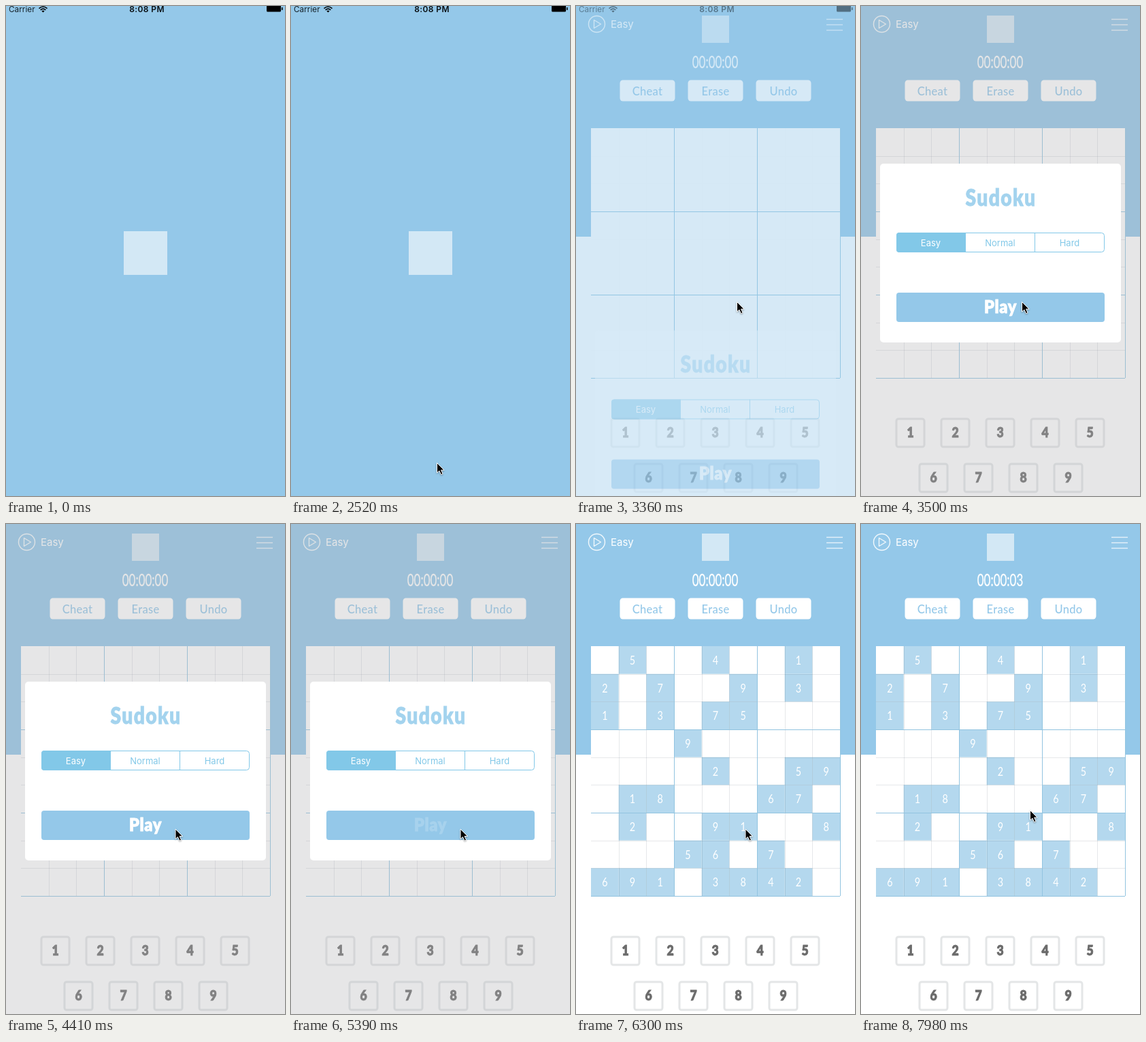
Write an HTML page that moves like this. It is 410 px wide and 718 px high and loops after 8.05 s.

```html
<!DOCTYPE html>
<html lang="en">
<head>
<meta charset="utf-8">
<title>Sudoku</title>
<style>
  html, body { margin: 0; width: 100%; height: 100%; overflow: hidden; background: #fff; }
  svg { display: block; width: 410px; height: 718px; }
  .ui { font-family: Inter, "Liberation Sans", sans-serif; }
  .geo { font-family: Lato, "Open Sans", sans-serif; }
  .black { font-weight: 900; }
</style>
</head>
<body>
<svg id="stage" viewBox="0 0 410 718" xmlns="http://www.w3.org/2000/svg"></svg>
<script>
const LOOP = 8050, STEP = 70;
const BLUE = '#94c8e9', TINT = '#82c8e8', TITLE = '#a3d3ee';
const GRID = { x: 22, y: 179, cell: 366 / 9 };
const PUZZLE = [
  '.5..4..1.', '2.7..9.3.', '1.3.75...',
  '...9.....', '....2..59', '.18...67.',
  '.2..91..8', '...56.7..', '691.3842.'
];

const rect = (x, y, w, h, fill, extra = '') =>
  `<rect x="${x}" y="${y}" width="${w}" height="${h}" fill="${fill}" ${extra}/>`;
const line = (x1, y1, x2, y2, stroke, width = 1) =>
  `<path d="M${x1} ${y1}L${x2} ${y2}" stroke="${stroke}" stroke-width="${width}"/>`;
const text = (s, x, y, size, fill, cls, extra = 'text-anchor="middle"') =>
  `<text x="${x}" y="${y}" font-size="${size}" fill="${fill}" class="${cls}" ${extra}>${s}</text>`;
const narrow = (s, x, y, size, fill, scale, cls = 'geo', extra = '') =>
  `<g transform="translate(${x} ${y}) scale(${scale} 1)">${
    text(s, 0, 0, size, fill, cls, 'text-anchor="middle" ' + extra)}</g>`;
const heavy = (s, x, y, size, fill, scale, extra = '') =>
  narrow(s, x, y, size, fill, scale, 'geo black', `stroke="${fill}" stroke-width=".8" ` + extra);

function header() {
  const buttons = ['Cheat', 'Erase', 'Undo'].map((label, i) =>
    rect(64.5 + i * 100, 108.5, 81, 31, '#fff', 'rx="4.5"') +
    text(label, 105 + i * 100, 130.5, 16.5, BLUE, 'geo', 'text-anchor="middle" font-weight="500" letter-spacing=".3"'));
  const bars = [19.5, 27.5, 35.5].map(y => line(368, y, 392, y, '#e4f1f9', 1.4));
  return rect(0, 0, 410, 338, BLUE) +
    '<g fill="none" stroke="#f1f8fc" stroke-width="1.4" stroke-linejoin="round">' +
    '<circle cx="30.5" cy="26.5" r="12"/><path d="M26.5 20.5V32.5L36.5 26.5Z"/></g>' +
    text('Easy', 51, 32, 15, '#fff', 'ui', '') +
    rect(185, 14, 40, 40, '#d3e8f5') + bars.join('') +
    narrow('00:00:00', 204.5, 91, 25, '#fff', .68, 'geo', 'id="timer" stroke="#fff" stroke-width=".3"') +
    buttons.join('');
}

function board() {
  const { x, y, cell } = GRID;
  let clues = '', thin = '', thick = '';
  PUZZLE.forEach((row, r) => [...row].forEach((d, c) => {
    if (d === '.') return;
    clues += rect(x + c * cell, y + r * cell, cell, cell, '#b4d8ee') +
      narrow(d, x + (c + .5) * cell, y + r * cell + 27, 18, '#fff', .8);
  }));
  for (let i = 1; i <= 9; i++) {
    const gx = Math.round(x + i * cell) + .5, gy = Math.round(y + i * cell) + .5;
    const both = stroke => line(gx, y, gx, y + 366, stroke) + line(x, gy, x + 366, gy, stroke);
    if (i % 3) thin += both('rgba(30,50,70,.11)');
    else thick += both('#92c4e0');
  }
  return rect(x, y, 366, 366, '#fff') + `<g id="clues">${clues}</g><g id="thin">${thin}</g>` + thick;
}

function keypad() {
  let out = '';
  for (let n = 1; n <= 9; n++) {
    const lower = n > 5;
    const cx = lower ? 106 + (n - 6) * 66 : 72 + (n - 1) * 66, cy = lower ? 691 : 625;
    out += rect(cx - 20, cy - 20, 41, 41, '#fff', 'rx="3" stroke="#e4e6e7" stroke-width="3"') +
      heavy(n, cx + .5, cy + 7, 20, '#6b6b6b', .88);
  }
  return out;
}

function dialog() {
  const labels = ['Easy', 'Normal', 'Hard'].map((s, i) =>
    text(s, 102.5 + i * 102, 351.5, 13, i ? TINT : '#fff', 'ui'));
  return rect(28, 231, 354, 262, '#fff', 'rx="5"') +
    heavy('Sudoku', 205.5, 293, 34, TITLE, .83, 'letter-spacing="1.6"') +
    rect(52.5, 332.5, 305, 28, '#fff', `rx="4" stroke="${TINT}"`) +
    `<path d="M154 332H56a4 4 0 0 0-4 4V357a4 4 0 0 0 4 4H154Z" fill="${TINT}"/>` +
    line(255.5, 332, 255.5, 361, TINT) + labels.join('') +
    rect(52, 420, 306, 43, BLUE, 'rx="4"') +
    heavy('Play', 205, 450, 25.5, '#fff', .92, 'id="play" letter-spacing=".7"');
}

function statusBar() {
  return text('Carrier', 4, 9, 11.8, '#15222a', 'ui', '') +
    '<g fill="none" stroke="#000" stroke-width="1.6"><path d="M48.5 3.6Q54.5-1.6 60.5 3.6M50.7 5.8Q54.5 2.4 58.3 5.8"/></g>' +
    '<path d="M52.4 7.2Q54.5 5.6 56.6 7.2L54.5 9.4Z"/>' +
    text('8:08 PM', 207, 9, 12, '#0a1014', 'ui', 'text-anchor="middle" font-weight="600" letter-spacing=".4"') +
    rect(383, -2, 21, 10.5, '#000', 'rx="1.5"') + rect(405, 2, 1.5, 4, '#000');
}

const stage = document.getElementById('stage');
stage.innerHTML = rect(0, 0, 410, 718, '#fff') + header() + board() + keypad() +
  rect(0, 0, 410, 718, 'rgb(178,178,181)', 'id="dim"') +
  `<g id="dialog">${dialog()}</g>` +
  rect(0, 0, 410, 718, BLUE, 'id="splash"') +
  rect(173, 330, 64, 64, '#d3e8f5', 'id="emblem"') +
  `<g id="status">${statusBar()}</g>` +
  '<path id="cursor" d="M0 0V14.6L3.4 11.5L6 17.2L8.6 16.1L6.1 10.6H10.6Z" stroke="#fff" stroke-width="1" ' +
  'stroke-linejoin="round" style="filter:drop-shadow(0 1px 1px rgba(0,0,0,.35))"/>';

const part = id => document.getElementById(id);
const [timer, clues, thin, dim, modal, splash, emblem, status, play, cursor] =
  ['timer', 'clues', 'thin', 'dim', 'dialog', 'splash', 'emblem', 'status', 'play', 'cursor'].map(part);

const progress = (t, from, to) => Math.min(1, Math.max(0, (t - from) / (to - from)));
const smooth = p => p * p * (3 - 2 * p);
const opacity = (el, value) => el.setAttribute('opacity', value);

// Each move: start time, end time, destination.
const MOVES = [
  [2520, 3290, 236.5, 433.5],
  [3990, 4410, 249, 447],
  [6370, 7210, 306, 185],
  [7840, 7980, 248.5, 419.5]
];

function cursorAt(t) {
  let x = 214.5, y = 669.5;
  for (const [from, to, tx, ty] of MOVES) {
    const p = smooth(progress(t, from, to));
    x += (tx - x) * p;
    y += (ty - y) * p;
  }
  return [x, y];
}

function draw(t) {
  const enter = progress(t, 3290, 3500), left = 1 - enter;
  const leave = smooth(progress(t, 5460, 5670));
  const [x, y] = cursorAt(t);

  opacity(splash, left ** 2.4);
  opacity(emblem, enter ? 0 : 1);
  opacity(status, left ** 2);
  opacity(thin, enter ** 3);
  opacity(dim, .32 * enter ** 3 * (1 - leave));
  opacity(modal, (1 - left ** 2) * (1 - leave));
  modal.setAttribute('transform', `translate(0 ${487 * (left ** 1.7 + leave)})`);
  opacity(play, 1 - .82 * progress(t, 5180, 5390));
  opacity(clues, leave);

  const seconds = t < 6510 ? 0 : Math.floor((t - 6510) / 525) + 1;
  timer.textContent = '00:00:0' + seconds;
  opacity(cursor, t < 2520 ? 0 : 1);
  cursor.setAttribute('transform', `translate(${x} ${y})`);
}

const start = performance.now();
function tick() {
  const t = (performance.now() - start) % LOOP;
  draw(Math.floor(t / STEP) * STEP);
  requestAnimationFrame(tick);
}
draw(0);
requestAnimationFrame(tick);
</script>
</body>
</html>
```
